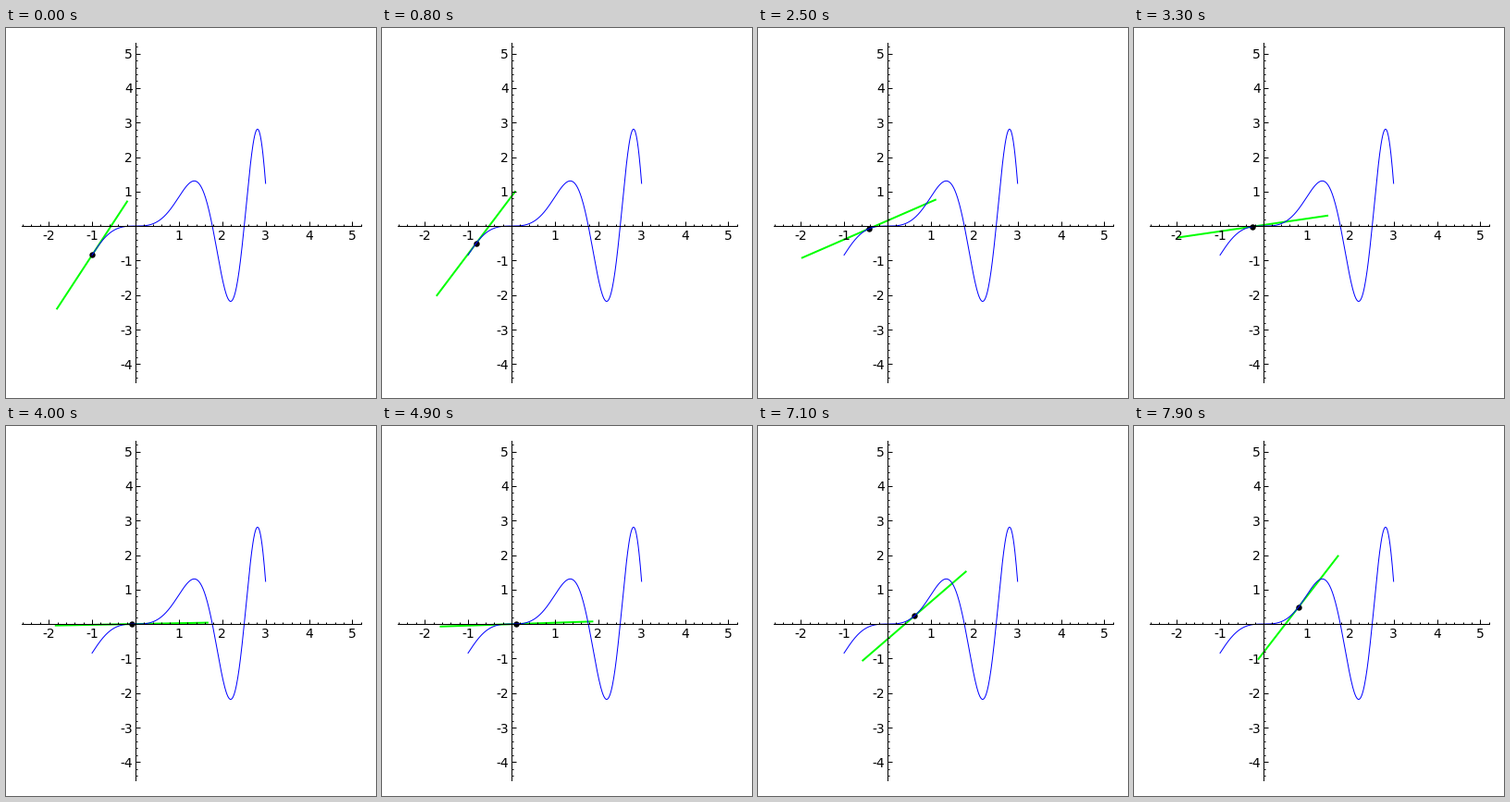
A matplotlib script for the animation above (8 s loop, 400 px wide and 400 px high).

```python
import numpy as np
import matplotlib.pyplot as plt
from matplotlib.animation import FuncAnimation
from matplotlib.ticker import AutoMinorLocator, FuncFormatter, MultipleLocator

SIZE, DPI = 400, 100
PX = 72 / DPI                   # one pixel in points
FRAMES, INTERVAL = 80, 100
X0, Y0 = 139.95, 214.1          # origin in pixels
SX, SY = 46.9, 37.3             # pixels per unit
LEFT, RIGHT, TOP, BOTTOM = 17, 384, 16, 383
START, STEP = -1, 0.0228
HALF = 1.75                     # half length of the tangent

plt.rcParams["font.family"] = "DejaVu Sans"


def f(x):
    return x * np.sin(x**2)


def slope(x):
    return np.sin(x**2) + 2 * x**2 * np.cos(x**2)


def setup_axes(fig):
    ax = fig.add_axes([LEFT / SIZE, 1 - BOTTOM / SIZE,
                       (RIGHT - LEFT) / SIZE, (BOTTOM - TOP) / SIZE])
    ax.set_xlim((LEFT - X0) / SX, (RIGHT - X0) / SX)
    ax.set_ylim((Y0 - BOTTOM) / SY, (Y0 - TOP) / SY)
    ax.patch.set_visible(False)
    ax.set_axisbelow(False)
    for side in ("top", "right"):
        ax.spines[side].set_visible(False)
    for side in ("left", "bottom"):
        ax.spines[side].set_position("zero")
        ax.spines[side].set_linewidth(PX)
    for axis in (ax.xaxis, ax.yaxis):
        axis.set_major_locator(MultipleLocator(1))
        axis.set_minor_locator(AutoMinorLocator(5))
        axis.set_major_formatter(
            FuncFormatter(lambda v, _: f"{v:.0f}" if abs(v) > 0.5 else ""))
    ax.tick_params(which="both", direction="in", width=PX)
    ax.tick_params(which="major", length=5 * PX, labelsize=10)
    ax.tick_params(which="minor", length=2 * PX)
    ax.tick_params(axis="x", pad=2.7)
    ax.tick_params(axis="y", pad=2.3)
    return ax


fig = plt.figure(figsize=(SIZE / DPI, SIZE / DPI), dpi=DPI, facecolor="white")
ax = setup_axes(fig)

tangent, = ax.plot([], [], color=(0, 1, 0), lw=2 * PX, clip_on=False,
                   solid_capstyle="projecting")
dot, = ax.plot([], [], "o", color="black", ms=6.4 * PX, mew=0)
xs = np.linspace(-1, 3, 400)
ax.plot(xs, f(xs), color="blue", lw=PX)


def update(i):
    x = START + STEP * i
    m = slope(x)
    dx = HALF / np.hypot(1, m)
    ends = np.array([-dx, dx])
    tangent.set_data(x + ends, f(x) + m * ends)
    dot.set_data([x], [f(x)])
    return tangent, dot


anim = FuncAnimation(fig, update, frames=FRAMES, interval=INTERVAL,
                     repeat=True, repeat_delay=0)
plt.show()
```
